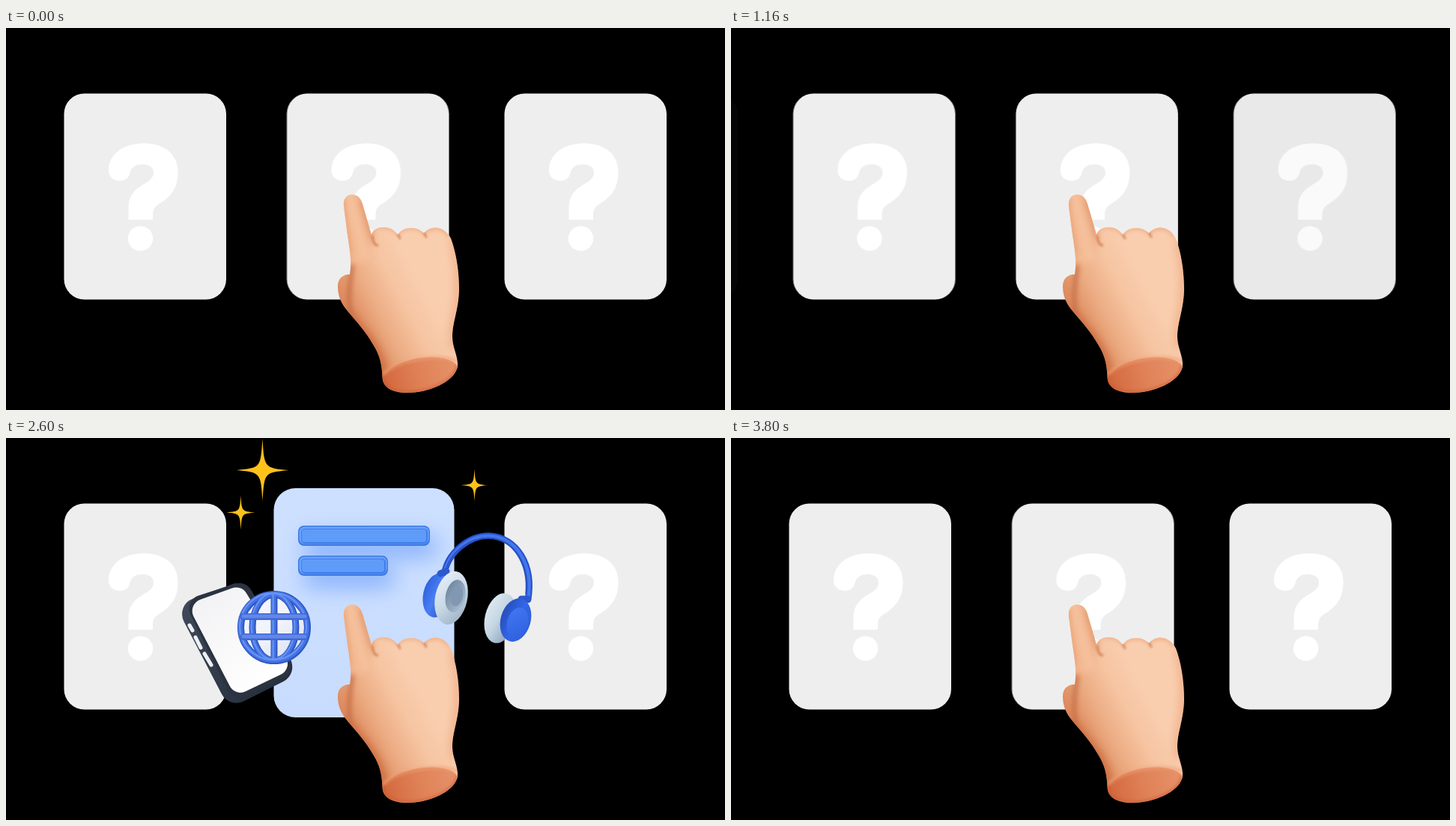
Animation, 960 px wide and 510 px high, one loop 4400 ms. Source, as an HTML page with a canvas:

```html
<!DOCTYPE html>
<html lang="en">
<head>
<meta charset="utf-8">
<title>Pick a card</title>
<style>
html, body { margin: 0; width: 100%; height: 100%; overflow: hidden; background: #000; }
canvas { display: block; width: 960px; height: 510px; }
</style>
</head>
<body>
<canvas id="stage" width="960" height="510"></canvas>
<script>
const W = 960, H = 510, LOOP = 4400, STEP = 40;
const ctx = document.getElementById('stage').getContext('2d');

const clamp = v => Math.max(0, Math.min(1, v));
const mix = (a, b, k) => a + (b - a) * k;
const span = (t, start, length) => clamp((t - start) / length);
const smooth = k => 0.5 - 0.5 * Math.cos(Math.PI * k);

// cubic-bezier(.42, 0, 1, 1), solved by bisection
function easeIn(x) {
  let lo = 0, hi = 1;
  for (let i = 0; i < 24; i++) {
    const s = (lo + hi) / 2, r = 1 - s;
    if (1.26 * r * r * s + 3 * r * s * s + s * s * s < x) lo = s; else hi = s;
  }
  return 3 * lo * lo - 2 * lo * lo * lo;
}

function layer(draw) {
  const c = document.createElement('canvas');
  c.width = W;
  c.height = H;
  const g = c.getContext('2d');
  g.lineCap = g.lineJoin = 'round';
  draw(g);
  return c;
}

function ramp(g, x0, y0, x1, y1, ...colors) {
  const r = g.createLinearGradient(x0, y0, x1, y1);
  colors.forEach((c, i) => r.addColorStop(i / (colors.length - 1), c));
  return r;
}

function fillBox(g, x, y, w, h, r, fill) {
  g.beginPath();
  g.roundRect(x, y, w, h, r);
  g.fillStyle = fill;
  g.fill();
}

function oval(g, x, y, rx, ry, deg, fill) {
  g.beginPath();
  g.ellipse(x, y, rx, ry, deg * Math.PI / 180, 0, 7);
  g.fillStyle = fill;
  g.fill();
}

function line(g, d, color, width) {
  g.strokeStyle = color;
  g.lineWidth = width;
  g.stroke(new Path2D(d));
}

function roundPoly(g, pts, r, fill) {
  const n = pts.length, [a, b] = [pts[0], pts[n - 1]];
  g.beginPath();
  g.moveTo((a[0] + b[0]) / 2, (a[1] + b[1]) / 2);
  pts.forEach((p, i) => g.arcTo(...p, ...pts[(i + 1) % n], r));
  g.closePath();
  g.fillStyle = fill;
  g.fill();
}

const mystery = layer(g => {
  fillBox(g, 77.5, 87.5, 216.5, 275, 27, '#eee');
  g.fillStyle = '#fff';
  g.fill(new Path2D(`M166 192C168 185 174 182 183 182C191 182 197 186 197 193
    C197 200 192 204 183 209C170 217 163.5 225 163.5 240V256H196V250
    C196 241 199 238 206 234C222 224 229.5 212 229.5 192
    C229.5 168 211 154 184 154C157 154 137 168 137 190
    C137 199 144 204 152 204C160 204 164 200 166 192Z`));
  oval(g, 179.5, 281, 16.8, 16.5, 0, '#fff');
});

const prize = layer(g => {
  fillBox(g, 357.5, 67, 241, 306, 29, ramp(g, 0, 67, 0, 373, '#cde0ff', '#c8dcff'));
  for (const [y, w] of [[117, 176], [157, 120]]) {
    g.save();
    g.shadowColor = 'rgba(92,148,250,.7)';
    g.shadowBlur = 30;
    g.shadowOffsetX = 8;
    g.shadowOffsetY = 14;
    fillBox(g, 390, y, w, 27, 8, '#3f7ae6');
    g.restore();
    fillBox(g, 391.5, y + 1.5, w - 3, 23, 7, '#6ba3fb');
    fillBox(g, 394, y + 4, w - 7, 20, 5, '#3f7eea');
    fillBox(g, 395, y + 5, w - 10, 17, 4, '#5f9bf9');
  }
});

const phone = layer(g => {
  roundPoly(g, [[226, 223], [319, 189], [391, 315], [298, 361]], 22,
    ramp(g, 234, 240, 370, 330, '#3d4858', '#262e3b'));
  roundPoly(g, [[237, 217], [320, 190], [388, 311], [304, 353]], 18, '#2b3341');
  roundPoly(g, [[242, 222], [314, 196], [383, 308], [306, 345]], 16,
    ramp(g, 250, 215, 345, 330, '#f2f2f4', '#fff'));
  line(g, 'M245 250L249 257M253 266L260 280M265 288L274 303', '#eef0f4', 5);
});

const globe = layer(g => {
  oval(g, 358, 253, 45, 45, 0, ramp(g, 330, 215, 390, 290, '#f4f6fd', '#f1f3fa', '#dbe2f3'));
  const tones = [['#2f57c6', 9, 0], ['#4474e4', 6, -0.6], ['#6a93f2', 2, -1.4]];
  const rings = [[29, 44], [44.5, 44.5]];
  for (const [color, width, off] of tones) {
    g.save();
    g.translate(off, off);
    g.strokeStyle = color;
    g.lineWidth = width;
    for (const [rx, ry] of rings) {
      g.beginPath();
      g.ellipse(358, 253, rx, ry, 0, 0, 7);
      g.stroke();
    }
    line(g, 'M358 209V297', color, width);
    g.restore();
  }
  line(g, 'M317 238.5H399M317 265.5H399', '#3f69d6', 9);
  line(g, 'M317 238H399M317 265H399', '#6388ea', 5);
});

const headset = layer(g => {
  const band = 'M585 182C590 152 619 130 645 130.5C682 132 705 170 697 216';
  line(g, band, '#2450cc', 8.5);
  line(g, band, '#4376ec', 4.5);
  line(g, 'M587 176C595 150 620 133 645 133.5C677 135 698 168 694 208', '#2a50bd', 1.5);
  oval(g, 576, 210, 19, 30, 12, ramp(g, 557, 200, 592, 215, '#2f60de', '#4a7ef2', '#2c55c6'));
  line(g, 'M580 181L588 178M688 215L697 215', '#2d58cf', 9);
  oval(g, 594.5, 213.5, 21.5, 36, 12, ramp(g, 576, 190, 616, 235, '#e4eef5', '#c9d9e6', '#9fb4c6'));
  oval(g, 600, 211, 13, 22, 12, ramp(g, 588, 200, 614, 218, '#6f87a3', '#a9bccd'));
  oval(g, 602, 211, 8, 14, 12, '#8298b2');
  oval(g, 660, 240.5, 20.5, 34, 14, ramp(g, 640, 225, 680, 250, '#dfeaf2', '#c4d5e2', '#8ea6bf'));
  oval(g, 680.5, 243, 20, 29.5, 16, ramp(g, 660, 235, 702, 255, '#264dba', '#3266e6', '#2d5edc'));
  oval(g, 683, 247, 14, 21, 16, ramp(g, 674, 230, 694, 265, '#4076f0', '#2f60e0'));
});

const hand = layer(g => {
  const shape = new Path2D(`M451 238C450 228 455 222.5 462 222.5C470 222.5 474 228 476 235
    L488 276C490 269 497 266 504 266C513 266 519 270 523 276
    C527 270 533 267 541 267C549 267 554 270 558 274
    C562 269 567 266.5 574 266.5C583 267 590 273 594 281
    C601 300 605 324 605 350C604 378 596 392 596 413C596 427 604 438 603 452
    C598 474 562 487 536 487C514 487 503 479 502.5 466C502 449 499 437 491 424
    C479 403 467 391 457 379C447 368 443 357 443 345C443 335 449 329 459 329
    C462 312 459 296 456 276Z`);
  g.save();
  g.clip(shape);
  g.fillStyle = ramp(g, 454, 375, 548, 325, '#dd895c', '#ecac83', '#f6c4a1', '#f9ceaf');
  g.fillRect(430, 210, 190, 290);
  g.fillStyle = ramp(g, 453, 260, 483, 252, '#f2b78f', '#f6c3a0', '#eba97e');
  g.filter = 'blur(4px)';
  g.fill(new Path2D('M445 215H480L490 285L484 310L462 318Z'));
  g.filter = 'blur(6px)';
  line(g, 'M597 285C604 310 606 340 602 375C597 395 596 400 597 425', '#eda57b', 7);
  line(g, 'M458 385C476 407 496 425 503 460', '#cc6c3f', 13);
  g.filter = 'blur(3px)';
  line(g, 'M451 230C450 245 456 270 459 300', '#e79d70', 4);
  line(g, 'M475 232L488 278', '#e2946a', 4);
  line(g, 'M488 268C496 262 514 263 523 273C532 264 548 264 558 272C566 264 584 264 592 276', '#e99f74', 4);
  line(g, 'M462 318C459 340 456 360 460 382', '#c46b43', 5);
  g.filter = 'blur(1.5px)';
  line(g, 'M489 278C490 287 493 290 496 290M523 275L526 281M558 273L561 279', '#cf7d50', 2.5);
  g.filter = 'none';
  oval(g, 553, 463, 51, 22, -10, ramp(g, 505, 475, 602, 448, '#d3683d', '#e08258', '#e6926a'));
  g.filter = 'blur(2px)';
  line(g, 'M503 466C505 479 514 487 536 487C562 487 598 474 603 452', '#cb5b32', 3);
  line(g, 'M505 461C520 446 570 434 601 444', '#ee9e74', 3);
  g.restore();
});

function put(img, cx, cy, scale, alpha, dx = 0, dy = 0) {
  if (alpha <= 0) return;
  ctx.save();
  ctx.globalAlpha = alpha;
  ctx.translate(cx + dx, cy + dy);
  ctx.scale(scale, scale);
  ctx.drawImage(img, -cx, -cy);
  ctx.restore();
}

const card = (x, alpha, scale = 1) => put(mystery, 185.75, 225, scale, alpha, x - 77.5);

function star(t, x, y, size, start, length) {
  const k = span(t, start, length), w = size * Math.sin(Math.PI * k), h = w * 1.2;
  if (w < 0.5) return;
  ctx.save();
  ctx.translate(x, y);
  ctx.scale(w, h);
  ctx.beginPath();
  ctx.moveTo(0, -1);
  for (const [px, py, qx, qy] of [[1, -1, 1, 0], [1, 1, 0, 1], [-1, 1, -1, 0], [-1, -1, 0, -1]])
    ctx.bezierCurveTo(px * 0.06, py * 0.08, px * 0.08, py * 0.06, qx, qy);
  ctx.fillStyle = '#ffc21a';
  ctx.fill();
  ctx.restore();
}

// x positions: leaving, left, middle, right, waiting
const SLOTS = [-213, 77.5, 375, 665.5, 961];

function draw(t) {
  ctx.fillStyle = '#000';
  ctx.fillRect(0, 0, W, H);

  const slide = t < 1300 ? smooth(span(t, 612, 600)) : 0;
  const press = smooth(span(t, 1380, 200));
  const reveal = smooth(span(t, 1579, 300));
  const back = easeIn(span(t, 3194, 600));
  const shown = reveal * (1 - back);
  const cover = t < 3000 ? 1 - press : back;
  const at = i => mix(SLOTS[i], SLOTS[i - 1], slide);

  card(at(1), 1 - slide);
  card(at(3), 1);
  card(at(4), slide);
  card(at(2), cover, mix(0.85, 1, cover));

  put(prize, 478, 220, mix(0.8, 1, shown), shown);
  put(phone, 308.5, 273, mix(0.75, 1, shown), shown);
  put(globe, 358, 253, mix(0.77, 1, shown), shown);
  put(headset, 629.5, 199.5, mix(0.8, 1, shown), shown);

  star(t, 342.5, 43, 35, 2060, 1120);
  star(t, 313.5, 99.5, 21, 2280, 900);
  star(t, 625.5, 63, 24, 2060, 740);

  put(hand, 524, 355, 1, 1, 0, 4 * (press - reveal));
}

const begin = performance.now();
function tick() {
  const t = (performance.now() - begin) % LOOP;
  draw(Math.floor(t / STEP) * STEP);
  requestAnimationFrame(tick);
}
tick();
</script>
</body>
</html>
```
